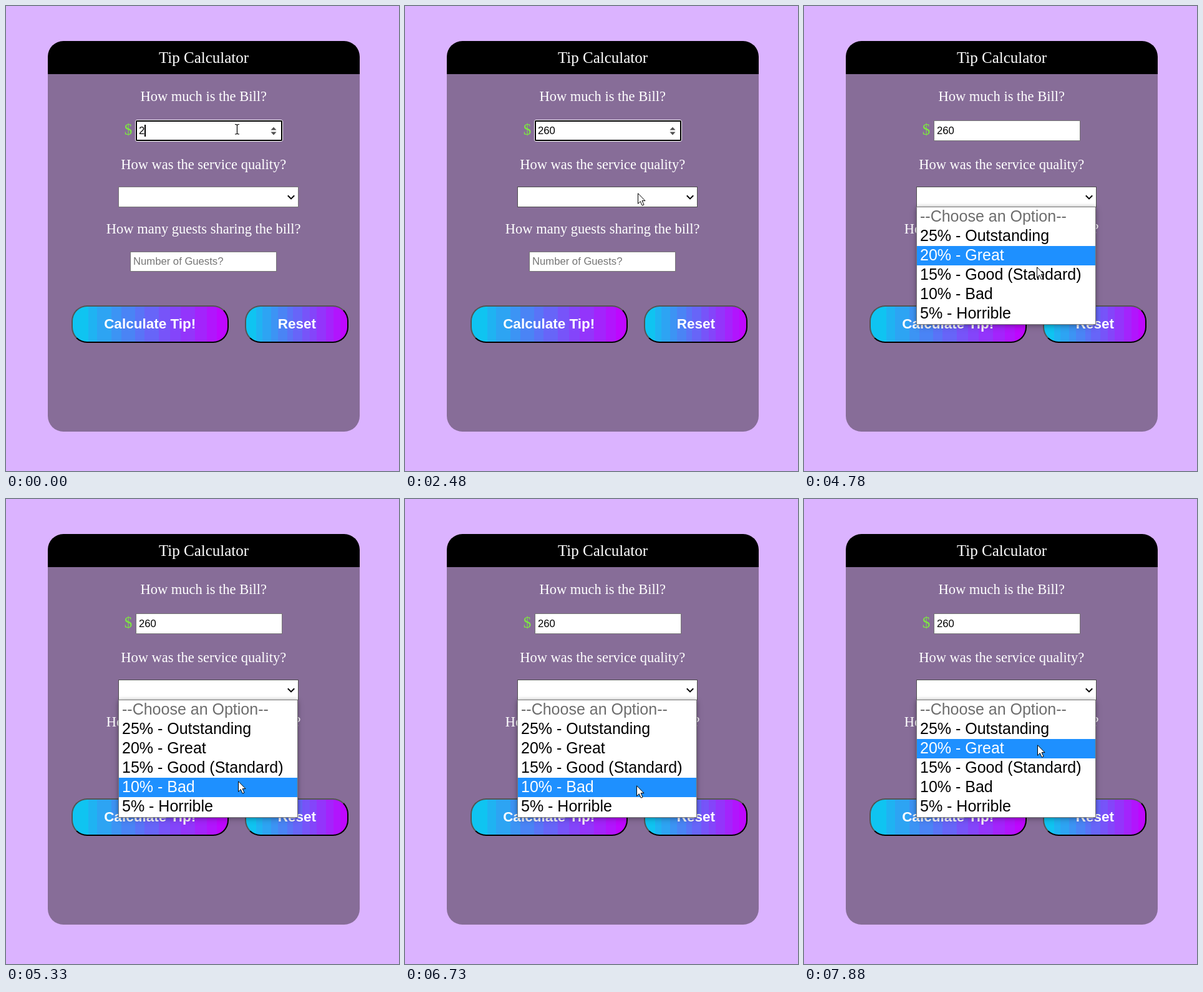
Animation, 630 px wide and 744 px high, one loop 8000 ms. Source, as an HTML page:

```html
<!DOCTYPE html>
<html lang="en">
<head>
<meta charset="utf-8">
<title>Tip Calculator</title>
<style>
  html, body { margin: 0; width: 100%; height: 100%; overflow: hidden; background: #dbb3ff; }
  .card, .btn, svg { position: absolute; box-sizing: border-box; }
  .card { left: 67px; top: 56px; width: 500px; height: 625px; border-radius: 25px;
    background: linear-gradient(#000 53px, #876d98 53px); }
  .btn { top: 479px; height: 60px; border: 2px outset #000; border-radius: 25px; }
  svg { left: 0; top: 0; }
  .serif { font: 22.5px "Liberation Serif", "Times New Roman", serif; fill: #fff; text-anchor: middle; }
  .sans { font: 16.667px "Liberation Sans", Arial, sans-serif; }
  .label { font: bold 22.5px "Liberation Sans", Arial, sans-serif; fill: #fff; text-anchor: middle; }
  .option { font: 25px "Liberation Sans", Arial, sans-serif; }
  #popup { filter: drop-shadow(0 0 3px rgba(0,0,0,.22)) drop-shadow(0 3px 5px rgba(0,0,0,.2)); }
</style>
</head>
<body>
<div class="card"></div>
<div class="btn" style="left:105px;width:252px"></div>
<div class="btn" style="left:383px;width:166px"></div>
<svg width="630" height="744" viewBox="0 0 630 744">
  <text class="serif" style="font-size:25px" x="317" y="91">Tip Calculator</text>
  <text class="serif" x="316.7" y="152">How much is the Bill?</text>
  <text class="serif" x="316.7" y="261">How was the service quality?</text>
  <text class="serif" x="316.7" y="364">How many guests sharing the bill?</text>
  <text class="serif" style="font-size:25px;fill:#7dea3f" x="196" y="206">$</text>

  <rect x="208.5" y="183.5" width="234" height="32" fill="#fff" stroke="#767676"/>
  <g id="focus">
    <rect x="207.5" y="182.5" width="236" height="34" rx="2.5" fill="none" stroke="#fff"/>
    <rect x="209" y="184" width="233" height="31" rx="1" fill="#fff" stroke="#000" stroke-width="2"/>
    <path d="M424.5 198.6L429 193.8L433.5 198.6ZM424.5 201.6H433.5L429 206.4Z" fill="#505050"/>
  </g>
  <text id="bill" class="sans" x="213" y="205"></text>
  <rect id="caret" y="190" width="2" height="19"/>

  <rect id="select" x="180.5" y="289.5" width="288" height="32" fill="#fff"/>
  <path d="M451.8 303.2L457 308.4L462.2 303.2" fill="none" stroke="#000" stroke-width="2"/>

  <rect x="199.5" y="393.5" width="234" height="31" fill="#fff" stroke="#767676"/>
  <text class="sans" x="204" y="414" fill="#757575">Number of Guests?</text>

  <text class="label" x="230.7" y="516">Calculate Tip!</text>
  <text class="label" x="466.3" y="516">Reset</text>

  <g id="popup">
    <rect x="180.5" y="321.5" width="287" height="188" fill="#fff" stroke="#767676"/>
  </g>
  <rect id="mark" x="181" width="286" height="31" fill="#1e90ff"/>
  <g id="options"></g>

  <path id="beam" d="M-3.5 -7.5H-1.5L0 -6.5L1.5 -7.5H3.5M0 -6.5V7M-3.5 8H-1.5L0 7L1.5 8H3.5"
        fill="none" stroke="#000" stroke-width="1.2"/>
  <path id="arrow" d="M.5 .8V17.3L4.3 13.6L7.2 20.2L10 19L7.1 12.6H12Z" fill="#fff" stroke="#000"/>
</svg>
<script>
const LOOP = 8000, ROW = 31, LIST_TOP = 322;
const OPEN = 2900, BLUR = 2750, HOVER = 290;
const $ = id => document.getElementById(id);
const show = (el, on) => el.setAttribute("visibility", on ? "visible" : "hidden");

// Banded gradient shared by both buttons
const edges = [0, 25, 40, 63, 79, 102, 117, 140, 159, 176, 199, 218, 235, 252].map(e => e / 252);
const from = [6, 206, 240], to = [196, 0, 255];
const bands = edges.slice(1).map((end, i) => {
  const mid = (edges[i] + end) / 2;
  const rgb = from.map((c, k) => Math.round(c + (to[k] - c) * mid));
  return `rgb(${rgb}) ${edges[i] * 100}% ${end * 100}%`;
});
for (const b of document.querySelectorAll(".btn"))
  b.style.backgroundImage = `linear-gradient(90deg, ${bands})`;

const names = ["--Choose an Option--", "25% - Outstanding", "20% - Great",
  "15% - Good (Standard)", "10% - Bad", "5% - Horrible"];
const options = names.map((name, i) => {
  const t = document.createElementNS("http://www.w3.org/2000/svg", "text");
  t.setAttribute("class", "option");
  t.setAttribute("x", 186);
  t.setAttribute("y", LIST_TOP + 23 + i * ROW);
  t.textContent = name;
  return $("options").appendChild(t);
});

// Pointer moves: start time, end time, x, then the height at each even step
const moves = [
  [0, 0, 370, 197],
  [1670, 2480, 373, 204, 220, 237, 254, 273, 290, 299],
  [3360, 4350, 373, 309, 318, 327, 336, 346, 356, 368, 381],
  [4500, 5200, 373, 393, 405, 417, 426, 434, 443],
  [5330, 5480, 372, 451, 455],
  [5750, 6460, 372, 462, 468, 474, 480, 486, 491],
  [6730, 6730, 371, 458],
  [6865, 7270, 373, 434, 410, 388, 373],
  [7720, 7880, 374, 383, 393]
];

function pointer(t) {
  const [start, end, x, ...ys] = moves.filter(m => m[0] <= t).pop();
  const gap = (end - start) / (ys.length - 1) || 1;
  const step = Math.min(ys.length - 1, Math.floor((t - start) / gap + 0.02));
  return { x, y: ys[step] };
}

function caretOn(t) {
  return t < 390 || (t >= 680 && t < 1390) || (t >= 1940 && t < 2345);
}

function draw(t) {
  const { x, y } = pointer(t);
  const text = t < 680 ? "2" : t < 810 ? "26" : "260";
  const open = t >= OPEN;

  $("bill").textContent = text;
  $("caret").setAttribute("x", 213 + 9 * text.length);
  show($("caret"), caretOn(t));
  show($("focus"), t < BLUR);
  $("select").setAttribute("stroke", y >= HOVER ? "#4f4f4f" : "#767676");

  const row = open ? Math.floor((y - 3 - LIST_TOP) / ROW) : 0;
  show($("popup"), open);
  show($("options"), open);
  show($("mark"), row > 0);
  $("mark").setAttribute("y", LIST_TOP + row * ROW);
  options.forEach((o, i) =>
    o.setAttribute("fill", i === 0 ? "#6d6d6d" : i === row ? "#fff" : "#000"));

  // Text fields and labels use the beam pointer
  const overText = y < 216 || (y > 241 && y < 267);
  show($("beam"), overText);
  show($("arrow"), !overText);
  $("beam").setAttribute("transform", `translate(${x + 0.5} ${y})`);
  $("arrow").setAttribute("transform", `translate(${x} ${y})`);
}

const begin = performance.now();
function tick() {
  draw((performance.now() - begin) % LOOP);
  requestAnimationFrame(tick);
}
tick();
</script>
</body>
</html>
```
